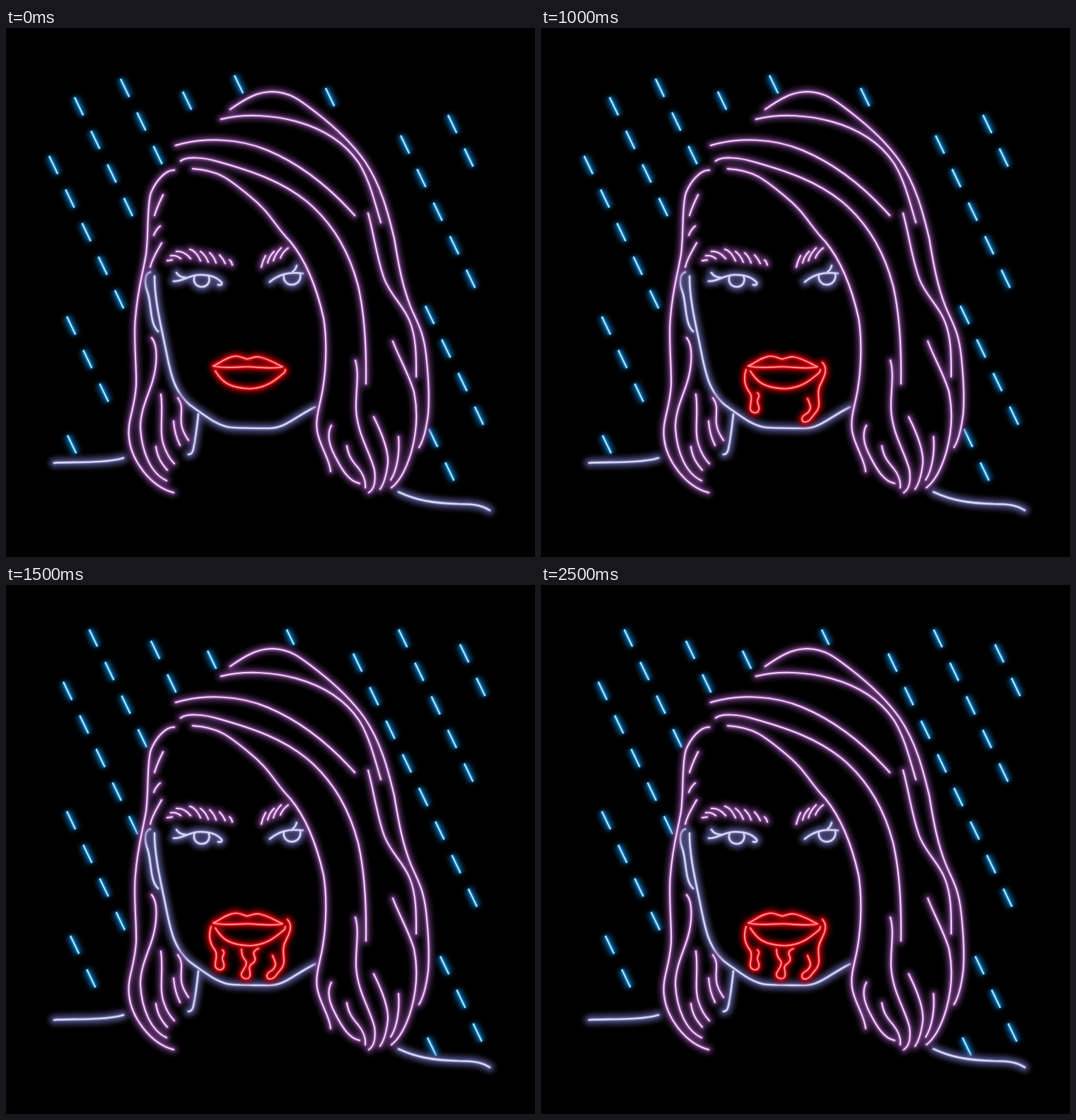
An HTML page for the animation above (3000 ms loop, 748 by 748 pixels).

```html
<!DOCTYPE html>
<html lang="en">
<head>
<meta charset="utf-8">
<title>Neon portrait in the rain</title>
<style>
html, body { margin: 0; width: 100%; height: 100%; overflow: hidden; background: #000; }
svg { display: block; width: 100vw; height: 100vh; }
</style>
</head>
<body>
<svg id="stage" viewBox="0 0 748 748" fill="none" stroke-linecap="round" stroke-linejoin="round">
<defs>
  <filter id="wide" filterUnits="userSpaceOnUse" x="0" y="0" width="748" height="748" color-interpolation-filters="sRGB"><feGaussianBlur stdDeviation="3.6"/></filter>
  <filter id="near" filterUnits="userSpaceOnUse" x="0" y="0" width="748" height="748" color-interpolation-filters="sRGB"><feGaussianBlur stdDeviation="1"/></filter>

  <g id="rain"><path id="drops" stroke-linecap="butt"/></g>

  <g id="skin">
    <path d="M210,351C210,385 219,420 226,455C232,485 237,514 260,533C280,547 300,564 320,565C340,566 350,566 372,566C395,566 408,550 437,536"/>
    <path d="M204,345C196,347 195,360 200,373C206,390 203,418 215,429"/>
    <path d="M272,546C270,565 268,580 265,595C264,600 262,603 258,603"/>
    <path d="M68,615C90,613 140,616 166,608"/>
    <path d="M555,656C580,668 605,672 640,673C665,673 675,676 684,682"/>
    <path d="M237,358C250,359 258,349 275,349C290,349 300,354 305,360C306,363 303,364 300,363"/>
    <path d="M241,346C244,351 249,353 255,353"/>
    <path d="M267,350C263,360 270,366 277,366C285,366 290,358 286,350"/>
    <path d="M373,359C384,350 397,344 420,347"/>
    <path d="M393,348C391,358 398,363 404,363C412,363 418,356 416,347"/>
    <path d="M411,336C410,340 408,343 405,345"/>
  </g>

  <g id="hair">
    <path d="M317,115C340,99 356,90 377,90C404,91 418,104 439,120C470,144 490,164 507,188C530,222 540,260 549,298C556,340 561,366 572,394C582,418 590,428 594,462C597,490 599,520 597,545C594,570 589,585 584,593"/>
    <path d="M304,129C340,120 380,124 410,132C450,143 480,163 499,191C514,215 521,245 530,275"/>
    <path d="M240,166C280,154 330,156 370,173C420,194 460,228 493,265"/>
    <path d="M247,188C255,181 280,183 300,189C350,203 390,217 425,245C460,274 485,315 498,365C506,400 510,440 509,503"/>
    <path d="M264,199C300,201 315,213 345,238C375,262 380,280 402,302C425,330 440,370 449,410C454,440 453,480 448,510C444,535 437,550 440,570C443,590 458,610 459,627"/>
    <path d="M238,201C225,200 211,218 205,233C199,250 202,290 198,320C193,350 186,370 183,410C180,440 185,480 184,505C182,540 171,555 174,580C177,610 203,648 237,657"/>
    <path d="M222,236C217,246 213,255 210,265"/>
    <path d="M218,280C213,284 211,288 209,293"/>
    <path d="M220,304C214,315 207,325 204,338"/>
    <path d="M206,438C216,450 213,480 207,500C201,520 190,540 190,565C192,600 205,630 227,640"/>
    <path d="M219,518C223,545 216,570 223,590C227,602 232,610 238,616"/>
    <path d="M212,592C214,607 220,616 228,625"/>
    <path d="M243,523C252,535 246,545 248,560C249,570 254,577 258,583"/>
    <path d="M237,556C238,570 241,580 246,590"/>
    <path d="M512,262C520,290 524,325 535,355C545,380 562,392 571,415C581,440 580,470 580,493"/>
    <path d="M547,443C555,465 570,490 577,515C583,545 580,575 573,600C567,620 558,640 545,650"/>
    <path d="M494,470C500,490 494,515 495,540C497,575 515,600 521,625C523,640 521,652 513,657"/>
    <path d="M520,550C530,570 541,595 540,615C538,632 534,645 529,652"/>
    <path d="M555,578C557,600 553,625 544,639"/>
    <path d="M460,562C453,575 457,590 465,605C475,625 485,641 500,644"/>
    <path d="M482,591C484,605 490,613 498,622C506,632 509,640 508,650"/>
    <path d="M228,329L235,328M233,322Q241,321 247,326M241,316C250,315 256,320 261,326M260,313C268,315 272,323 275,329"/>
    <path d="M275,316Q282,321 286,331M288,318Q294,323 297,332M302,321Q307,326 310,333M316,328Q319,330 320,335"/>
    <path d="M361,338Q363,329 367,322M370,332Q372,323 379,316M378,329Q381,319 389,311M388,325Q391,317 399,311"/>
  </g>

  <g id="lips">
    <path d="M293,478C305,472 315,464 325,464C333,464 337,468 341,468C346,468 350,464 357,465C370,467 380,474 391,479C375,483 355,479 342,479C325,479 310,482 293,478Z"/>
    <path d="M296,485C305,500 315,509 345,510C370,509 383,496 394,487L395,483"/>
    <path class="drip" d="M290,483C286,495 288,507 296,517C300,524 295,532 296,539C298,545 306,546 308,540C310,533 303,530 307,524C309,520 309,518 306,516"/>
    <path class="drip" d="M398,473C406,482 401,492 396,502C390,513 393,522 393,532C393,541 386,546 381,553C377,558 369,559 369,553C369,545 379,548 381,537C381,531 378,528 377,524"/>
    <path class="drip" d="M333,515C333,521 334,526 338,530C343,535 336,543 333,549C331,556 342,560 345,553C347,545 341,543 346,537C352,533 354,530 351,524C349,520 351,516 357,514"/>
  </g>
</defs>
</svg>
<script>
const STEP = 500, STEPS = 6, TOP = 63;
const stage = document.getElementById('stage');
const drops = document.getElementById('drops');
const drips = [...document.querySelectorAll('.drip')];

// Each tube is drawn as layers: colour, width, opacity, blur
const tubes = {
  rain: [['#0b70b8', 12, .72, 'wide'], ['#1d9ae6', 4.2, .9, 'near'], ['#b4e6ff', 2, 1]],
  skin: [['#5c5c9c', 14, .72, 'wide'], ['#8080bd', 4.6, .8, 'near'], ['#d3d3f0', 2.6, 1]],
  hair: [['#6b3a7c', 12, .72, 'wide'], ['#a765b8', 4.4, .9, 'near'], ['#efd3f4', 2, 1]],
  lips: [['#a80008', 12, .8, 'wide'], ['#ff1420', 4.4, 1, 'near'], ['#ffa0a2', 1.7, 1]]
};

for (const [id, layers] of Object.entries(tubes)) {
  for (const [color, width, opacity, blur] of layers) {
    const use = document.createElementNS('http://www.w3.org/2000/svg', 'use');
    use.setAttribute('href', '#' + id);
    use.setAttribute('stroke', color);
    use.setAttribute('stroke-width', width);
    use.setAttribute('opacity', opacity);
    if (blur) use.setAttribute('filter', `url(#${blur})`);
    stage.append(use);
  }
}

// Streaks of rain: x, y of the first dash and the number of dashes
const showers = [
  [[61, 181, 5], [97, 98, 4], [162, 72, 3], [250, 90, 1], [323, 67, 1], [452, 85, 1],
   [558, 152, 5], [625, 123, 2], [593, 393, 4], [598, 567, 2], [86, 408, 3], [87, 576, 1]],
  [[81, 137, 5], [117, 61.5, 4], [205, 79, 2], [285, 93, 1], [395, 59, 1], [491, 97, 8],
   [555, 62.5, 5], [642, 84, 2], [614, 525, 3], [596, 640, 1], [86, 320, 4], [91, 496, 2]]
];

function dash(x, y) {
  const cut = Math.max(0, TOP - y);
  return `M${x + cut * .48},${y + cut}L${x + 12.2},${y + 25.4}`;
}

const rainPaths = showers.map(streaks => streaks.map(([x, y, n]) =>
  Array.from({ length: n }, (_, i) => dash(x + i * 23.25, y + i * 47.5)).join('')).join(''));

let shown = -1;
function draw(time) {
  const step = Math.floor(time / STEP) % STEPS;
  if (step !== shown) {
    shown = step;
    drops.setAttribute('d', rainPaths[step % 2]);
    drips.forEach((drip, i) => drip.setAttribute('visibility', step > i ? 'visible' : 'hidden'));
  }
}

const start = performance.now();
function tick() {
  draw(performance.now() - start);
  requestAnimationFrame(tick);
}
tick();
</script>
</body>
</html>
```
